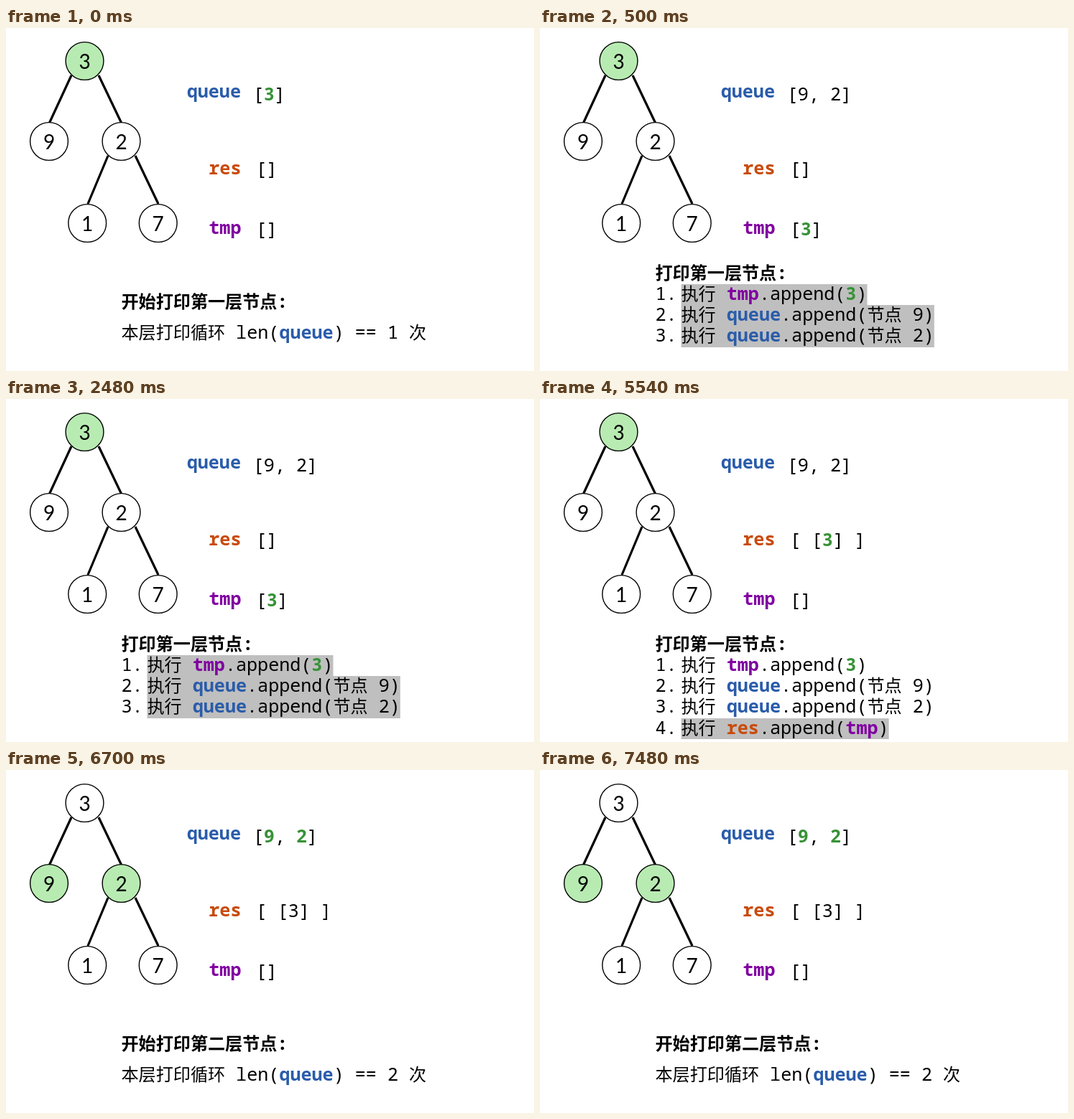
These frames come from a looping animation (735x478 px, 8000 ms). An HTML page with a canvas:

```html
<!DOCTYPE html>
<html lang="zh-CN">
<head>
<meta charset="utf-8">
<title>层序遍历</title>
<style>
  html, body { margin: 0; width: 100%; height: 100%; overflow: hidden; background: #fff; }
  canvas { display: block; }
</style>
</head>
<body>
<canvas id="stage" width="735" height="478"></canvas>
<script>
const ctx = document.getElementById('stage').getContext('2d');
const LOOP = 8000;
const MONO = '25.1px "Noto Sans Mono", monospace';
const HAN = '24.1px "Noto Sans CJK SC", "Noto Sans CJK", sans-serif';
const COLORS = { queue: '#2a5caa', res: '#c84b0b', tmp: '#8000a0', number: '#379237' };
const LEFT = 160.5, INDENT = 196.5, ROW_TOP = 357, ROW_HEIGHT = 29.2;

const nodes = [[3, 109.5, 46], [9, 60, 158], [2, 160.5, 158], [1, 113.2, 272], [7, 211.7, 272]];
const edges = [[91, 66, 60.5, 132], [129, 66, 160.5, 132], [142, 178, 114, 245], [180, 178, 212, 245]];

const steps = [
  '执行 {tmp}.append({3})',
  '执行 {queue}.append(节点 9)',
  '执行 {queue}.append(节点 2)',
  '执行 {res}.append({tmp})'
];

const intro = (level, count) => () => {
  rich(`开始打印第${level}层节点:`, LEFT, 390, true);
  rich(`本层打印循环 len({queue}) == ${count} 次`, LEFT, 433);
};

const list = (count, marked) => () => {
  rich('打印第一层节点:', LEFT, 350, true);
  steps.slice(0, count).forEach((step, i) => {
    const top = Math.round(ROW_TOP + i * ROW_HEIGHT);
    const bottom = Math.round(ROW_TOP + (i + 1) * ROW_HEIGHT);
    const baseline = ROW_TOP + 22 + i * ROW_HEIGHT;
    if (marked.includes(i)) {
      const width = rich(step, INDENT, baseline, false, false) - INDENT;
      ctx.fillStyle = '#bfbfbf';
      ctx.fillRect(INDENT, top, width, bottom - top);
    }
    rich(`${i + 1}.`, LEFT, baseline);
    rich(step, INDENT, baseline);
  });
};

const scenes = [
  { start: 0, active: [3], queue: '[{3}]', res: '[]', tmp: '[]', notes: intro('一', 1) },
  { start: 500, active: [3], queue: '[9, 2]', res: '[]', tmp: '[{3}]', notes: list(3, [0, 1, 2]) },
  { start: 3800, active: [3], queue: '[9, 2]', res: '[ [{3}] ]', tmp: '[]', notes: list(4, [3]) },
  { start: 6700, active: [9, 2], queue: '[{9}, {2}]', res: '[ [3] ]', tmp: '[]', notes: intro('二', 2) }
];

// Draws text where {word} is bold and coloured; returns the x where it ends.
function rich(text, x, y, bold = false, paint = true) {
  for (const part of text.split(/(\{.*?\}|[\u4e00-\u9fff]+)/)) {
    if (!part) continue;
    const accent = part[0] === '{';
    const word = accent ? part.slice(1, -1) : part;
    const face = /[\u4e00-\u9fff]/.test(word) ? HAN : MONO;
    ctx.font = (bold || accent ? 'bold ' : '') + face;
    ctx.fillStyle = accent ? COLORS[word] || COLORS.number : '#000';
    if (paint) ctx.fillText(word, x, y);
    x += ctx.measureText(word).width;
  }
  return x;
}

function drawTree(active) {
  ctx.strokeStyle = '#000';
  ctx.lineWidth = 3.2;
  for (const [x1, y1, x2, y2] of edges) {
    ctx.beginPath();
    ctx.moveTo(x1, y1);
    ctx.lineTo(x2, y2);
    ctx.stroke();
  }
  ctx.lineWidth = 1.4;
  ctx.font = '28px Lato, sans-serif';
  ctx.textAlign = 'center';
  for (const [value, x, y] of nodes) {
    ctx.beginPath();
    ctx.arc(x, y, 26.4, 0, Math.PI * 2);
    ctx.fillStyle = active.includes(value) ? '#b8ebb2' : '#fff';
    ctx.fill();
    ctx.stroke();
    ctx.fillStyle = '#000';
    ctx.fillText(value, x, y + 11);
  }
  ctx.textAlign = 'left';
}

function draw(scene) {
  ctx.fillStyle = '#fff';
  ctx.fillRect(0, 0, 735, 478);
  drawTree(scene.active);
  rich('{queue}', 251.7, 97);
  rich(scene.queue, 343.7, 100.7);
  rich('{res}', 282.3, 204);
  rich(scene.res, 347.7, 205);
  rich('{tmp}', 282.3, 287);
  rich(scene.tmp, 347.7, 288.5);
  scene.notes();
}

const origin = performance.now();
function tick() {
  const time = (performance.now() - origin) % LOOP;
  draw(scenes.findLast(scene => scene.start <= time));
  requestAnimationFrame(tick);
}
tick();
</script>
</body>
</html>
```
